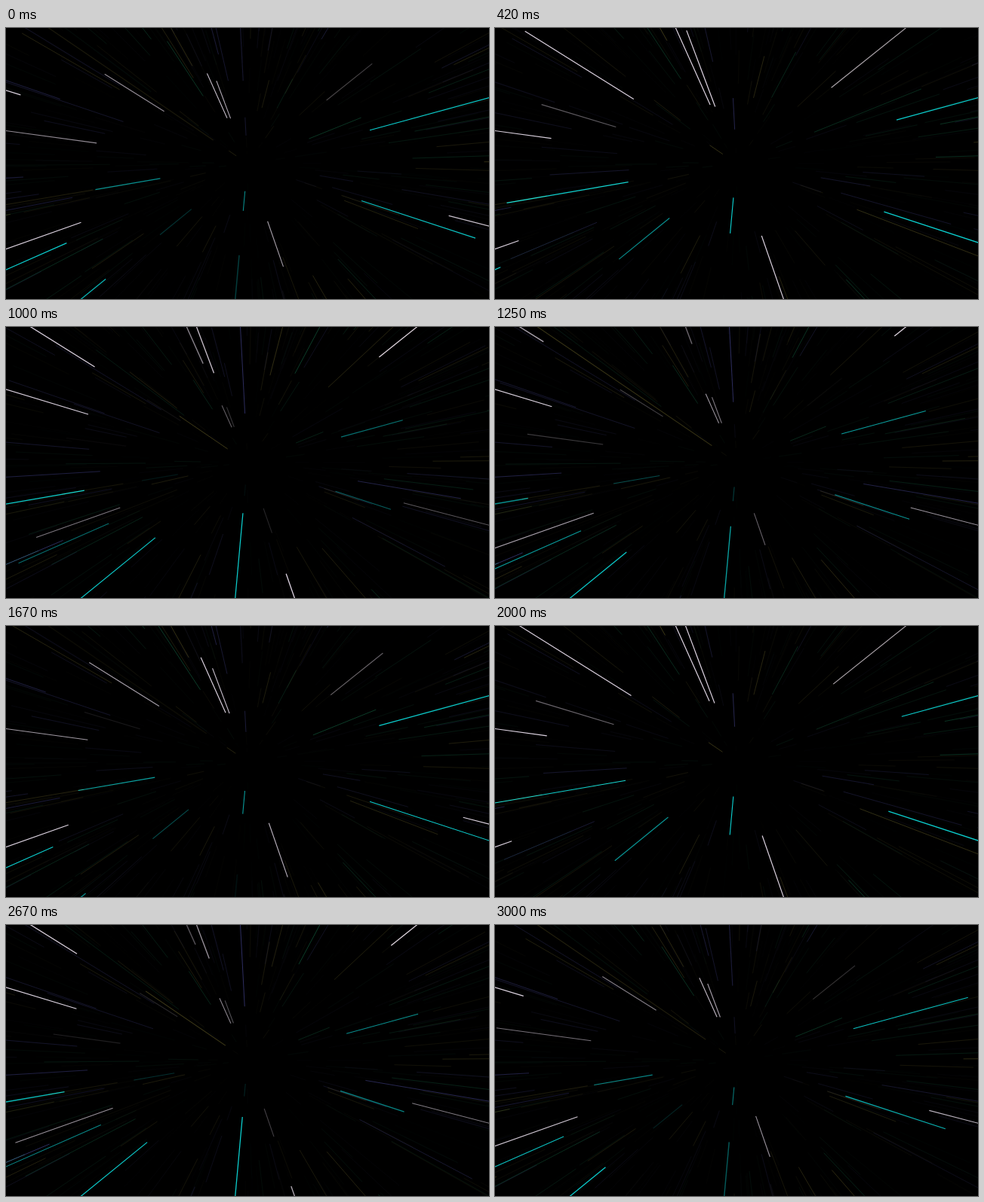
An HTML page with a canvas that plays this animation: 640x360 px, repeating every 3080 ms.

```html
<!DOCTYPE html>
<html lang="en">
<head>
<meta charset="utf-8">
<title>Star warp</title>
<style>
  html, body { margin: 0; width: 100%; height: 100%; overflow: hidden; background: #000; }
  canvas { display: block; width: 100vw; height: 100vh; }
</style>
</head>
<body>
<canvas id="sky" width="640" height="360"></canvas>
<script>
const ctx = document.getElementById('sky').getContext('2d');

const LOOP = 3080;      // ms
const FRAME = 1000 / 12;
const PERIOD = 18.5;    // frames until the field repeats
const TRAIL = 11;       // streak length, in frames of travel
const PEAK = 9;         // a star is brightest this long before it passes
const LIFE = 14;        // half of its visible time
const FADE = 7;
const NEAR = 0.5;

const CYAN = [10, 205, 205];
const WHITE = [222, 212, 226];
const DIM = [[70, 70, 150], [125, 115, 45], [20, 115, 75]];

function seeded(seed) {
  return () => (seed = (seed * 16807) % 2147483647) / 2147483647;
}

// x and y are the offset from the centre at unit depth;
// pass is the time at which the head reaches the camera.
const lead = (color, x, y, pass) =>
  ({ color, x, y, pass, peak: pass - PEAK, alpha: 1, width: 1 });

function faintStar(rand) {
  const angle = rand() * Math.PI * 2;
  const reach = 250 + 11500 * rand() ** 0.6;
  const peak = rand() * PERIOD;
  return {
    color: DIM[Math.floor(rand() * DIM.length)],
    x: Math.cos(angle) * reach,
    y: Math.sin(angle) * reach * 0.75,
    pass: peak + PEAK + rand() * 24,
    peak,
    alpha: 0.08 + 0.6 * rand() ** 3,
    width: 0.8,
  };
}

const rand = seeded(4711);
const stars = [
  lead(CYAN, 3436, -938, 28.7),
  lead(CYAN, 3322, 1090, 29.5),
  lead(CYAN, -88, 975, 15.5),
  lead(CYAN, -2983, 513, 14.8),
  lead(CYAN, -5128, 2260, 28.9),
  lead(CYAN, -2273, 1857, 19.6),
  lead(WHITE, -2915, -1828, 33.9),
  lead(WHITE, -5376, -730, 34.4),
  lead(WHITE, 665, 1920, 32.5),
  lead(WHITE, -600, -1340, 29.7),
  lead(WHITE, -543, -1449, 31.7),
  lead(WHITE, -4675, 1660, 28.7),
  lead(WHITE, 3140, -2520, 19),
  lead(WHITE, -4600, -1395, 22.8),
  lead(WHITE, 6000, 1560, 30),
  ...Array.from({ length: 420 }, () => faintStar(rand)),
];

function drawStreak(star, time) {
  const glow = Math.min(1, (LIFE - Math.abs(time - star.peak)) / FADE);
  const tail = star.pass + TRAIL - time;
  if (glow <= 0 || tail <= NEAR) return;
  const head = Math.max(star.pass - time, NEAR);
  const haze = Math.min(1, (32 / (head + tail)) ** 1.5);
  ctx.strokeStyle = `rgba(${star.color},${star.alpha * glow * haze})`;
  ctx.lineWidth = star.width * Math.min(2, 0.9 + 5 / tail);
  ctx.beginPath();
  ctx.moveTo(star.x / tail, star.y / tail);
  ctx.lineTo(star.x / head, star.y / head);
  ctx.stroke();
}

function render(now) {
  const step = Math.min(36, Math.floor((now % LOOP + 5) / FRAME));
  const phase = step % PERIOD;
  ctx.setTransform(1, 0, 0, 1, 0, 0);
  ctx.globalCompositeOperation = 'source-over';
  ctx.fillStyle = '#000';
  ctx.fillRect(0, 0, 640, 360);
  ctx.translate(320, 180);
  ctx.globalCompositeOperation = 'lighter';
  for (const star of stars) {
    for (let cycle = -1; cycle <= 2; cycle++) drawStreak(star, phase + cycle * PERIOD);
  }
}

const start = performance.now();
function tick() {
  render(performance.now() - start);
  requestAnimationFrame(tick);
}
tick();
</script>
</body>
</html>
```
